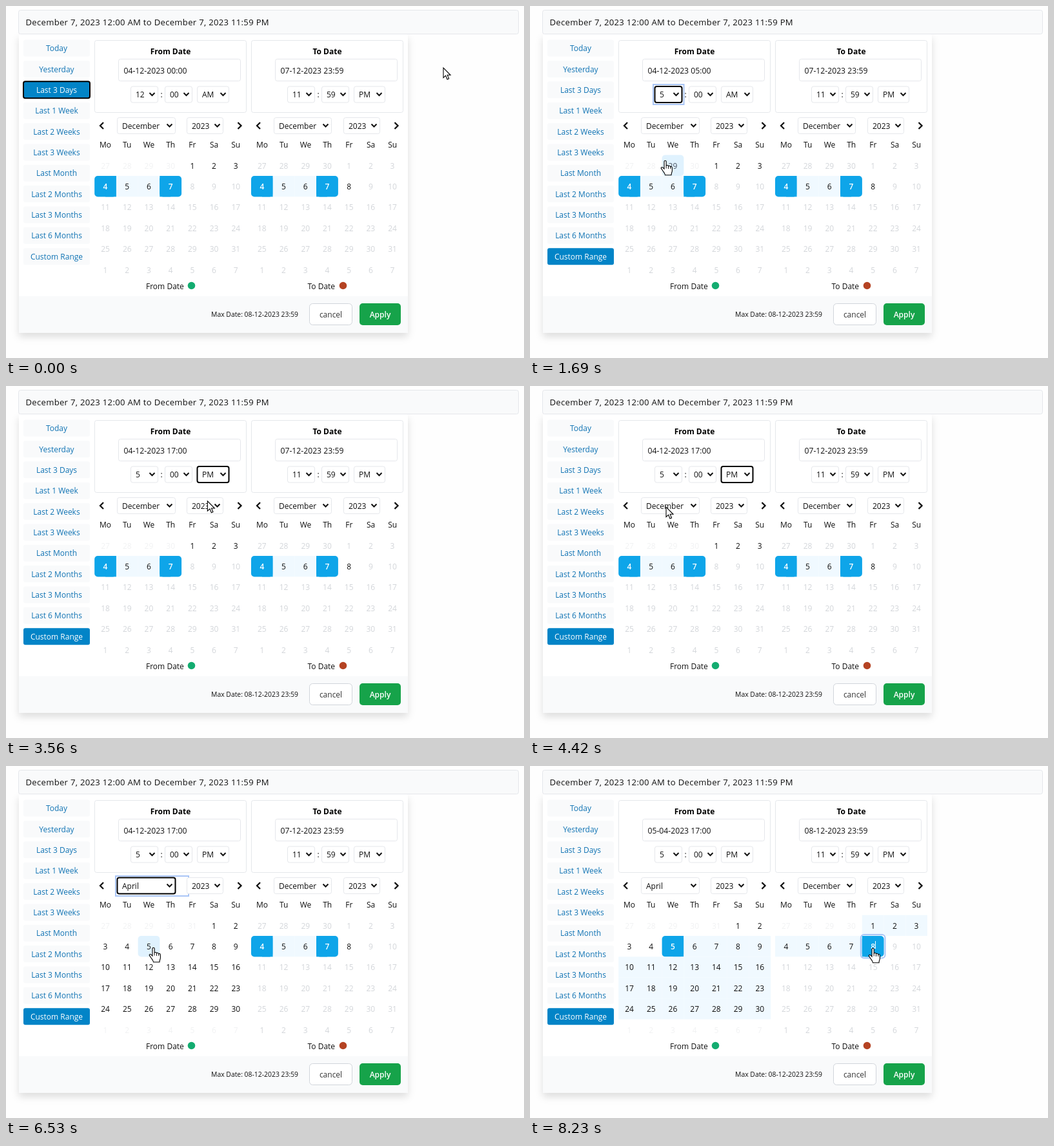
An HTML page for the animation above (8.63 s loop, 803 by 547 pixels).

```html
<!DOCTYPE html>
<html lang="en">
<head>
<meta charset="utf-8">
<title>Date range picker</title>
<style>
  html, body { margin: 0; width: 100%; height: 100%; overflow: hidden; background: #fefefe; }
  svg { display: block; width: 803px; height: 547px; font: 12px "Open Sans", "Noto Sans", sans-serif; cursor: default; }
  .card { filter: drop-shadow(0 6px 6px rgba(0, 0, 0, .13)); }
  .pop { filter: drop-shadow(0 8px 15px rgba(0, 0, 0, .3)); }
</style>
</head>
<body>
<svg viewBox="0 0 803 547"><g id="base"></g><g id="live"></g></svg>
<script>
const LOOP = 8630, INK = '#111', LINE = '#e5e7eb', PALE = '#f9fafb', SKY = '#0ea5e9', SHIFT = 243;
const CELL_W = 33.7, CELL_H = 32.4, GRID_X = 137.2, GRID_Y = 231.6;
const PRESETS = ['Today', 'Yesterday', 'Last 3 Days', 'Last 1 Week', 'Last 2 Weeks', 'Last 3 Weeks',
  'Last Month', 'Last 2 Months', 'Last 3 Months', 'Last 6 Months', 'Custom Range'];
const MONTHS = ['January', 'February', 'March', 'April', 'May', 'June', 'July', 'August',
  'September', 'October', 'November', 'December'];
const HOURS = MONTHS.map((_, i) => i + 1);
const DECEMBER = { lead: 4, before: 30, days: 31 }, APRIL = { lead: 5, before: 31, days: 30 };

// start, end, steps, x, y, bend
const MOVES = [
  [80, 690, 9, 209, 141], [1080, 1310, 4, 210, 240], [2010, 2490, 7, 318, 145],
  [2790, 2790, 1, 318, 164], [2870, 3100, 4, 317, 176], [3490, 4040, 8, 209, 240],
  [4190, 4420, 4, 211, 188], [4820, 5270, 7, 210, 258], [5980, 6130, 3, 234, 281],
  [6280, 6360, 2, 229, 282], [7080, 7850, 11, 532, 283, 28]
];
const CLICKS = [[1540, 1615], [3180, 3260], [5350, 5500], [6590, 6680], [8155, 8230]];

const rect = (x, y, w, h, fill, more = '') =>
  `<rect x="${x}" y="${y}" width="${w}" height="${h}" fill="${fill}" ${more}/>`;
const box = (x, y, w, h, r = 3, fill = '#fff', stroke = LINE, sw = 1) =>
  rect(x + .5, y + .5, w - 1, h - 1, fill, `rx="${r}" stroke="${stroke}" stroke-width="${sw}"`);
const text = (s, x, cy, fill = INK, more = '') =>
  `<text x="${x}" y="${cy + 4.3}" fill="${fill}" ${more}>${s}</text>`;
const mid = (s, x, cy, fill, more = '') => text(s, x, cy, fill, 'text-anchor="middle" ' + more);
const line = (d, w, color = INK) => `<path d="${d}" fill="none" stroke="${color}" stroke-width="${w}"/>`;
const halo = (x, y, w, h, r = 0) => rect(x, y, w, h, 'none', `rx="${r}" stroke="#a9c5f6" stroke-width="2"`);

function select(label, x, y, w, ring) {
  return box(x, y, w, 26, 3, '#fff', ring ? '#000' : LINE, ring ? 2 : 1) + text(label, x + 8, y + 13.5) +
    line(`M${x + w - 13.5} ${y + 10.5}l4 4 4-4`, 2);
}

function list(x, y, w, items, chosen, cur) {
  const row = Math.floor((cur.y - y) / 18), hot = row >= 0 && row < items.length ? row : chosen;
  const h = items.length * 18;
  return `<g class="pop">${rect(x, y, w, h, '#fff', 'rx="5"')}</g>` +
    rect(x, y + hot * 18, w, 18, '#1a67d2', hot % (items.length - 1) ? '' : 'rx="4"') +
    items.map((s, i) => text(s, x + 7, y + 9.5 + i * 18, i === hot ? '#fff' : INK)).join('') +
    rect(x, y, w, h, 'none', 'rx="5" stroke="#8a8a8a" stroke-width=".8"');
}

// Day grid: lo..hi can be picked, from..to is tinted, start and end are filled.
function calendar(dx, m, o, cur) {
  let out = '';
  for (let i = 0; i < 42; i++) {
    const n = i - m.lead + 1, x = GRID_X + dx + i % 7 * CELL_W, y = GRID_Y + Math.floor(i / 7) * CELL_H;
    const inside = n >= 1 && n <= m.days, off = n < o.lo || n > o.hi;
    const picked = n === o.start || n === o.end;
    const hover = cur.cell && !off && cur.x >= x && cur.x < x + CELL_W && cur.y >= y && cur.y < y + CELL_H;
    const size = [CELL_W + .1, CELL_H];
    if (picked) {
      out += rect(x, y, ...size, SKY, 'rx="5"') +
        rect(n === o.start ? x + 17 : x, y, 16.8, CELL_H, SKY);
      if (n === o.focus) out += halo(x - 2, y - 2, CELL_W + 4, CELL_H + 4, 5);
    } else if (hover) out += rect(x, y, ...size, '#e0f2fe', 'rx="5"');
    else if (inside && n >= o.from && n <= o.to) out += rect(x, y, ...size, '#f0f9ff');
    const fill = picked ? '#fff' : off ? '#d3d6da' : inside ? INK : hover ? '#4b5563' : '#f1f2f3';
    out += mid(n < 1 ? m.before + n : n > m.days ? n - m.days : n, x + CELL_W / 2, y + 16.6, fill,
      picked ? 'font-weight="600"' : '');
  }
  return out;
}

function side(dx, title) {
  const x = 137 + dx;
  return box(x, 53, 236, 113) + mid(title, 255 + dx, 70.5, '#000', 'font-weight="700"') +
    box(174 + dx, 82, 190, 35) + text(':', 239.5 + dx, 137.5) +
    line(`M${151 + dx} 181l-5 5 5 5`, 2.3) + line(`M${359.5 + dx} 181l5 5-5 5`, 2.3) +
    ['Mo', 'Tu', 'We', 'Th', 'Fr', 'Sa', 'Su'].map((s, i) =>
      mid(s, GRID_X + dx + (i + .5) * CELL_W, 216)).join('');
}

function base() {
  return rect(0, 0, 803, 547, '#fefefe') +
    `<g class="card">${rect(20, 44, 603, 464, '#fff', 'rx="3"')}</g>` +
    box(19, 6, 776, 38, 3, PALE) +
    text('December 7, 2023 12:00 AM to December 7, 2023 11:59 PM', 30.5, 25.5, INK,
      'font-size="13.1" letter-spacing=".3"') +
    rect(20, 451, 603, 57, PALE) +
    side(0, 'From Date') + side(SHIFT, 'To Date') +
    text('From Date', 217, 435.5) + '<circle cx="287.5" cy="434.5" r="5.8" fill="#13ac70"/>' +
    text('To Date', 467.5, 435.5) + '<circle cx="522.5" cy="434.5" r="5.8" fill="#b54323"/>' +
    text('Max Date: 08-12-2023 23:59', 318, 478.7, INK, 'font-size="10.4"') +
    box(470, 462, 67, 34, 5, '#fff', '#d1d5db') + mid('cancel', 503.5, 479.5, '#333', 'font-weight="500"') +
    rect(548, 462, 64, 34, '#16a34a', 'rx="5"') + mid('Apply', 580, 479.5, '#fff', 'font-weight="600"');
}

function presets(active, ring) {
  return PRESETS.map((s, i) => {
    const cy = 65.6 + i * 32.36, on = s === active, y = cy - 13;
    return rect(27, y, 103, 26, on ? '#0284c7' : PALE, 'rx="3"') +
      (on && ring ? rect(27, y, 103, 26, 'none', 'rx="3" stroke="#000" stroke-width="2"') : '') +
      mid(s, 78.5, cy + .3, on ? '#fff' : '#1174b4');
  }).join('');
}

function cursorAt(t) {
  let x = 678, y = 96;
  for (const [t0, t1, n, tx, ty, bend = 0] of MOVES) {
    if (t < t0) break;
    const step = t >= t1 ? n : 1 + Math.floor((t - t0) / (t1 - t0) * (n - 1));
    const p = step / n, e = p * p * (3 - 2 * p);
    x += (tx - x) * e;
    y += (ty - y) * e + bend * Math.sin(Math.PI * p);
  }
  return { x, y };
}

function pointer({ x, y, cell }) {
  const d = cell
    ? 'M-2 2C-2-.4 1.2-.4 1.2 2V8.5C1.6 7 4.4 7.2 4.5 9 5 8 7.6 8.2 7.8 10 8.4 9 10.4 9.4 10.4 11.5V16' +
      'C10.4 18 9 19.5 9 22.8H-.5C-.7 20-3 18-4.5 15.5L-6.6 12.4C-7.4 10.8-5.4 9.8-4 11.2L-2 13.2Z'
    : 'M0 0V15.5L3.6 12.2 6 18 8.6 17 6.2 11.3H11Z';
  return `<g transform="translate(${x} ${y})"><path d="${d}" fill="#fff" stroke="#000" stroke-width="1.1"/>` +
    (cell ? line('M1.2 8v4.5M4.5 9v4M7.8 10v3', 1) : '') + '</g>';
}

function live(t) {
  const during = (a, b) => t >= a && t < b;
  const hourOpen = during(770, 1615), halfOpen = during(2570, 3260), monthOpen = during(4510, 5500);
  const custom = t >= 1615, pm = t >= 3260, april = t >= 5500, start = t >= 6590, end = t >= 8155;
  const cur = cursorAt(t);
  const column = (cur.x - GRID_X) % SHIFT;
  cur.cell = !hourOpen && !halfOpen && !monthOpen && cur.x > GRID_X && cur.x < 615 &&
    column < 7 * CELL_W && cur.y > GRID_Y && cur.y < GRID_Y + 6 * CELL_H;

  const time = pm ? '17:00' : custom ? '05:00' : '00:00';
  const lastDay = end ? 8 : 7;
  const left = !april ? { lo: -9, hi: 7, start: 4, end: 7, from: 4, to: 7 }
    : start ? { lo: -9, hi: 99, start: 5, from: 5, to: 30, focus: end ? 0 : 5 } : { lo: -9, hi: 99 };
  const right = start ? { lo: -9, hi: 8, end: lastDay, from: 1, to: lastDay, focus: end ? 8 : 0 }
    : { lo: 4, hi: 8, start: 4, end: 7, from: 4, to: 7 };

  let out = presets(custom ? 'Custom Range' : 'Last 3 Days', t < 770) +
    text((start ? '05-04' : '04-12') + '-2023 ' + time, 182.5, 100.3, INK, 'font-size="12.2"') +
    text(`0${lastDay}-12-2023 23:59`, 425.5, 100.3, INK, 'font-size="12.2"');
  if (during(770, 2570)) out += halo(191, 122, 47.5, 31);
  if (during(4510, 6590)) out += halo(170, 171, 113, 31);
  out += select(custom ? 5 : 12, 193, 124.5, 43, during(1615, 2570)) + select('00', 246, 124.5, 43) +
    select(pm ? 'PM' : 'AM', 296, 124.5, 50, during(3260, 4510)) +
    select(11, 436, 124.5, 43) + select(59, 489, 124.5, 43) + select('PM', 539, 124.5, 49) +
    select(april ? 'April' : 'December', 172, 173, 91, during(5500, 6590)) + select(2023, 280, 173, 57) +
    select('December', 415, 173, 90) + select(2023, 523, 173, 57) +
    calendar(0, april ? APRIL : DECEMBER, left, cur) + calendar(SHIFT - .2, DECEMBER, right, cur);
  if (end) out += line('M535.5 272v12', 1, '#fff');
  if (hourOpen) out += list(193, 150.5, 43, HOURS, 11, cur);
  if (halfOpen) out += list(297, 151, 49, ['AM', 'PM'], 0, cur);
  if (monthOpen) out += list(172.5, 200.5, 90, MONTHS, 11, cur);
  if (CLICKS.some(c => during(...c)))
    out += `<circle cx="${cur.x - 1}" cy="${cur.y + 2}" r="12" fill="#f2e63c" opacity=".75"/>`;
  return out + pointer(cur);
}

const layer = document.getElementById('live');
let shown = '';
document.getElementById('base').innerHTML = base();

function tick() {
  const next = live(performance.now() % LOOP);
  if (next !== shown) layer.innerHTML = shown = next;
  requestAnimationFrame(tick);
}
tick();
</script>
</body>
</html>
```
